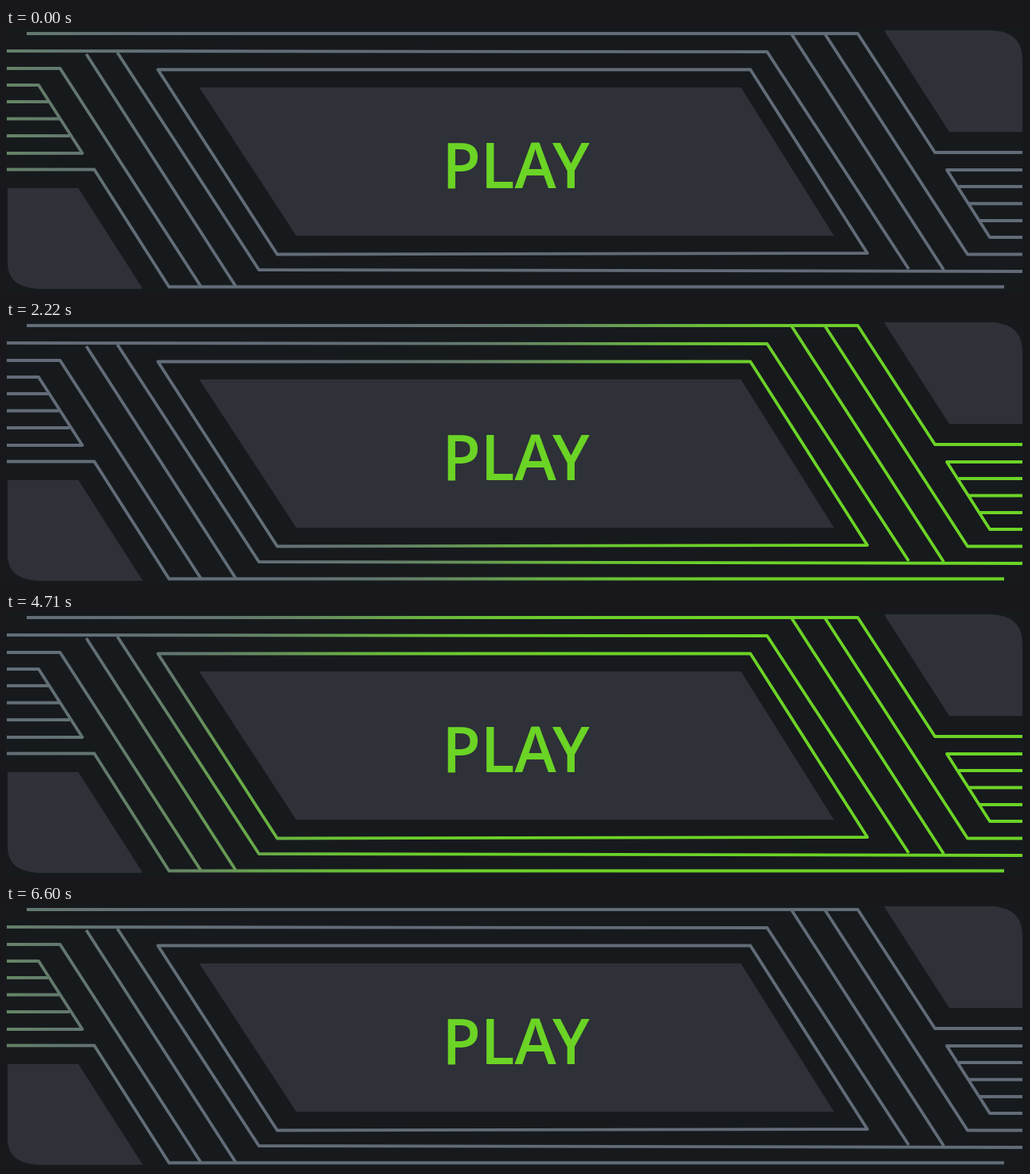
These frames come from a looping animation (1280 by 333 pixels, 6630 ms). An HTML page:

```html
<!DOCTYPE html>
<html lang="en">
<head>
<meta charset="utf-8">
<title>Play button</title>
<style>
  html, body { margin: 0; width: 100%; height: 100%; overflow: hidden; background: #171a1d; }
  svg { display: block; width: 1280px; height: 333px; }
  .panel { fill: #2e3138; }
  .lines { fill: none; stroke: url(#glow); stroke-width: 3.8; stroke-linejoin: round; }
  text { font: 600 79px "Open Sans", "Noto Sans", sans-serif; fill: #6bd425; text-anchor: middle; }
</style>
</head>
<body>
<svg viewBox="0 0 1280 333">
  <defs>
    <radialGradient id="glow" gradientUnits="userSpaceOnUse" cx="0" cy="0" r="1.6"></radialGradient>
  </defs>
  <g class="panel">
    <path d="M243 75H924L1041 262H365Z"/>
    <path d="M1104 3H1240Q1278 5 1278 40V131H1186Z"/>
    <path d="M2 202H91L172 329H40Q2 327 2 296Z"/>
  </g>
  <g class="lines">
    <path d="M26 7H1071L1168 157H1278"/>
    <path d="M1 29L957 30L1135 304"/>
    <path d="M1 51H68L245 326"/>
    <path d="M1 72H41L96 158H1M1 93H53M1 114.500H67M1 136H80"/>
    <path d="M1 178.500H111L205 326.500H1255"/>
    <path d="M101 33L289 326"/>
    <path d="M140 31L318 305L1278 307"/>
    <path d="M191 52.500H936L1083 284L341 285.500Z"/>
    <path d="M988 8L1179 305"/>
    <path d="M1030 8L1209 285.500H1278"/>
    <path d="M1278 179H1183L1237 264H1278M1198 200H1278M1210 221.500H1278M1224 243H1278"/>
  </g>
  <text x="641" y="202">PLAY</text>
</svg>
<script>
  const LOOP = 6630, SWEEP = 3000, STEP = 30;
  const GREY = [98, 108, 120], GREEN = [108, 212, 38];
  const glow = document.getElementById("glow");
  const mix = k => GREY.map((c, i) => Math.round(c + (GREEN[i] - c) * k));

  // Soft edge centred on the rim of the ellipse (radius 1).
  for (let i = 0; i <= 24; i++) {
    const radius = 0.4 + i * 0.05;
    const stop = document.createElementNS("http://www.w3.org/2000/svg", "stop");
    stop.setAttribute("offset", radius / 1.6);
    stop.setAttribute("stop-color", `rgb(${mix(1 / (1 + Math.exp((radius - 1) * 10)))})`);
    glow.append(stop);
  }

  // The slanted ellipse sweeps right, rests, then sweeps back.
  function draw(now) {
    const t = Math.floor((now % LOOP) / STEP) * STEP;
    const p = Math.max(0, Math.min(t, LOOP - STEP - t, SWEEP)) / SWEEP;
    const x = -830 + 2930 * p;
    glow.setAttribute("gradientTransform", `matrix(740 0 -130 310 ${x} 172)`);
  }

  let start;
  function tick(now) {
    start ??= now;
    draw(now - start);
    requestAnimationFrame(tick);
  }
  draw(0);
  requestAnimationFrame(tick);
</script>
</body>
</html>
```
